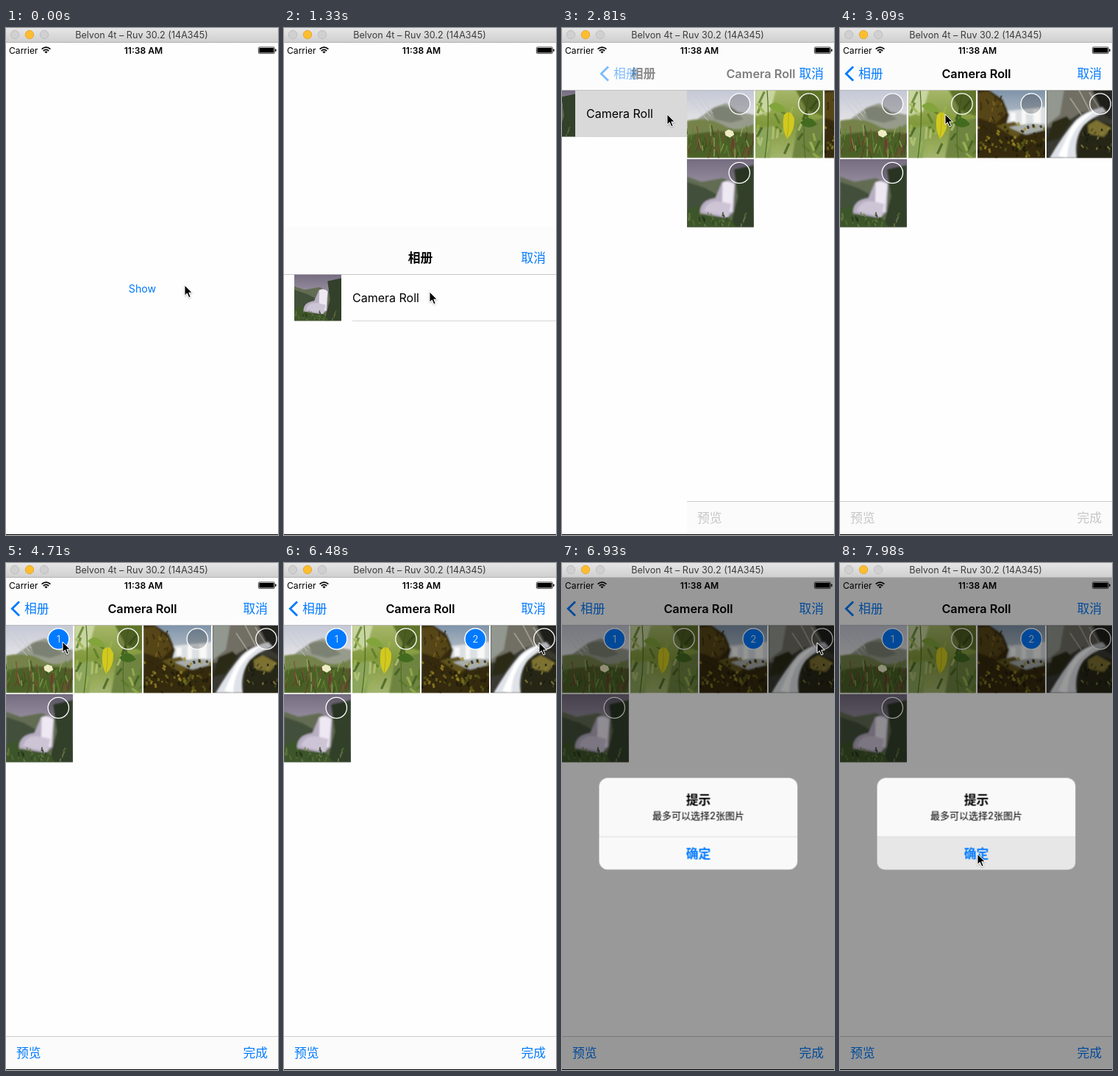
Animation of 370 by 688 pixels, one loop 8000 ms. Source, as an HTML page:

```html
<!DOCTYPE html>
<html lang="zh-CN">
<head>
<meta charset="utf-8">
<title>Photo picker</title>
<style>
  html, body { margin: 0; width: 100%; height: 100%; overflow: hidden; background: #fefefe; }
  svg { display: block; }
  text { font-family: Inter, "Noto Sans CJK SC", "Noto Sans CJK", sans-serif; font-size: 16.8px; white-space: pre; }
  .mid { text-anchor: middle; }
  .end { text-anchor: end; }
  .bold { font-weight: 600; }
  .blue { fill: #007aff; }
</style>
</head>
<body>
<svg id="stage" width="370" height="688" viewBox="0 0 370 688"></svg>
<script>
const LOOP = 8000;
const stage = document.getElementById('stage');

let seed = 7;
const rnd = () => (seed = (seed * 16807) % 2147483647) / 2147483647;
const pick = list => list[Math.floor(rnd() * list.length)];

const rect = (x, y, w, h, fill, more = '') =>
  `<rect x="${x}" y="${y}" width="${w}" height="${h}" fill="${fill}" ${more}/>`;
const shape = (d, fill, more = '') => `<path d="${d}" fill="${fill}" ${more}/>`;
const line = (d, stroke, width = 1, more = '') =>
  `<path d="${d}" fill="none" stroke="${stroke}" stroke-width="${width}" ${more}/>`;
const label = (x, y, text, cls = '', more = '') =>
  `<text x="${x}" y="${y}" class="${cls}" ${more}>${text}</text>`;
const fade = (id, ...colors) =>
  `<linearGradient id="${id}" x1="0" y1="0" x2="0" y2="1">` +
  colors.map((c, i) => `<stop offset="${i / (colors.length - 1)}" stop-color="${c}"/>`).join('') +
  '</linearGradient>';
const soft = content => `<g filter="url(#soft)">${content}</g>`;

// Scattered strokes inside a box; lean and length set the look of grass or moss
function flecks(count, x, y, w, h, colors, lean, length, width) {
  let out = '';
  for (let i = 0; i < count; i++) {
    const px = x + rnd() * w, py = y + rnd() * h;
    const dx = (rnd() - 0.5) * lean, dy = length * (0.4 + rnd() * 0.6);
    out += line(`M${px.toFixed(1)} ${py.toFixed(1)}l${dx.toFixed(1)} ${(-dy).toFixed(1)}`,
      pick(colors), width, 'opacity=".75"');
  }
  return out;
}

const meadow = rect(0, 0, 92, 93, 'url(#haze)') +
  soft(shape('M0 50L20 36 37 24 54 18 70 30 92 34V62H0Z', '#969b8b') +
    shape('M34 27Q50 18 64 28L78 40 60 45 38 40Z', '#7b8273') +
    shape('M0 42Q30 36 50 48T92 46V93H0Z', '#75834c') +
    shape('M0 62Q45 52 92 60V93H0Z', '#4c6027')) +
  line('M0 8L29 42M5 0L32 36M14 0L35 32', '#c8cbd2', 0.9) +
  flecks(70, 0, 60, 92, 35, ['#5f8435', '#38501d', '#824d39', '#9aa85c', '#693c2f'], 9, 17, 1.6) +
  shape('M52 57l5-3 6 2 2 5-6 4-6-3Z', '#eeecc4');

const leaves = rect(0, 0, 93, 93, 'url(#leafy)') +
  soft(shape('M0 0H28L20 30 0 36Z', '#c9d5a0') + shape('M55 0H93V36L70 28Z', '#61742b') +
    shape('M58 48L93 38V93H50Z', '#6e8440') + shape('M0 55L26 48 20 93H0Z', '#8ca65b')) +
  flecks(34, 0, 18, 93, 80, ['#577a25', '#9bb350', '#b8c77b', '#3e5d1b'], 22, 17, 3.2) +
  line('M13 93Q20 45 16 0M68 93Q62 45 75 0', '#506c25', 1.2) +
  shape('M18 22Q30 10 43 29Q28 33 18 22Z', '#82a53b') +
  shape('M61 45Q73 31 84 47Q72 56 61 45Z', '#436b20') +
  shape('M39 34Q47 25 53 39Q54 56 43 67Q35 52 39 34Z', '#d2c91f') +
  line('M45 31Q46 50 43 66', '#aaa51a', 0.8);

const mossFall = rect(0, 0, 93, 93, 'url(#dusk)') +
  soft(shape('M38 29L93 23V55H30Z', '#dce0e3') +
    shape('M45 31h7v20h-7ZM60 28h6v20h-6ZM76 27h10v21H76Z', '#f8f8f6') +
    shape('M0 0H15L34 13 43 34 38 52 60 57 93 47V93H0Z', '#352a10') +
    shape('M0 4L15 2 32 16 39 32 25 46 0 38Z', '#574415') +
    shape('M25 49L50 43 65 55 52 66Z', '#60521a') +
    shape('M42 51Q66 44 93 47V54L66 61Z', '#a8adaa')) +
  flecks(75, 0, 49, 93, 44, ['#77701e', '#29250e', '#a18c28', '#1d1a0b', '#58591a'], 8, 6, 3) +
  flecks(16, 3, 13, 32, 32, ['#332811', '#7a6322'], 8, 7, 2);

const stream = rect(0, 0, 91, 93, '#393932') +
  soft(shape('M0 0H91V20L46 32 20 48 0 52Z', '#716e64') +
    shape('M0 0H24L18 34 0 48Z', '#92988f') +
    shape('M62 0H91V42L78 34Z', '#272820') +
    shape('M8 44L27 36 34 43 18 66 0 71Z', '#292c19') +
    shape('M46 50L62 39 91 49V93H41Z', '#262719') +
    shape('M56 48L68 41 88 52 78 64 57 60Z', '#7d7131')) +
  soft(shape('M76 23Q51 29 39 42Q22 62 4 93H41Q37 66 51 48Q62 37 82 30Z', '#dfe2e8') +
    shape('M66 28Q42 36 31 57L16 90 28 93Q29 63 49 43Z', '#fff')) +
  line('M44 0L59 29M58 3L72 25M32 11L48 35', '#b8b6ae', 2, 'opacity=".6"') +
  flecks(24, 49, 55, 42, 36, ['#88813b', '#4b4b23', '#161911'], 8, 6, 2.4);

const valley = rect(0, 0, 92, 93, 'url(#violet)') +
  soft(shape('M0 24L20 31 49 26 67 33 92 18V93H0Z', '#626c52') +
    shape('M0 31L24 39 41 48 45 66 0 72Z', '#42503b') +
    shape('M65 14L92 8V93H59L70 51Z', '#33402a') +
    shape('M0 69Q27 57 52 72L68 93H0Z', '#3e552b') +
    shape('M18 74Q17 56 39 53L48 32Q58 26 66 34L64 72 54 80Z', '#b8afc2')) +
  soft(shape('M49 32Q57 28 65 34L62 72 48 74Z', '#eee8f3') +
    shape('M23 71Q29 54 48 58L61 61 57 79Z', '#cdc4d6')) +
  flecks(30, 0, 75, 92, 18, ['#304820', '#5c7238', '#203118', '#71804a'], 7, 7, 2);

const photos = [[0, 84, meadow], [93, 84, leaves], [187, 84, mossFall], [281, 84, stream], [0, 178, valley]];
const rings = [[71.5, 103], [166, 103], [260.3, 103], [354, 103], [71.3, 196.5]];

const photo = (x, y, content, w = x ? 92 : 91, h = 92.5) =>
  `<svg x="${x}" y="${y}" width="${w}" height="${h}" viewBox="0 0 92 93" preserveAspectRatio="none">${content}</svg>`;
const ring = ([x, y]) =>
  `<circle cx="${x}" cy="${y}" r="14.2" fill="rgba(0,0,0,.2)" stroke="#fff" stroke-width="1.3"/>`;
const badge = (id, [x, y], n) => `<g id="${id}">
  <circle cx="${x}" cy="${y}" r="14.2" fill="#007aff" stroke="#fff" stroke-width="1.2"/>
  ${label(x, y + 4.8, n, 'mid', 'fill="#fff" style="font-size:13.5px;font-weight:300"')}</g>`;
const light = (x, fill, edge) =>
  `<circle cx="${x}" cy="9" r="5.7" fill="${fill}" stroke="${edge}" stroke-width=".8"/>`;

stage.innerHTML = `
<defs>
  <filter id="soft"><feGaussianBlur stdDeviation="1.1"/></filter>
  <filter id="shade" x="-50%" y="-50%" width="200%" height="200%">
    <feDropShadow dx="0" dy="1" stdDeviation=".8" flood-opacity=".3"/></filter>
  ${fade('bar', '#e7e6e7', '#cfcecf')}
  ${fade('haze', '#c4c8d6', '#e6e5e6', '#cdd2c7')}
  ${fade('leafy', '#a6b769', '#81983b', '#a4b570')}
  ${fade('dusk', '#7e93aa', '#c3c9cc', '#59502d')}
  ${fade('violet', '#756c80', '#a19aa9', '#586050')}
</defs>
${rect(0, 0, 370, 688, '#fefefe')}
<g id="show">${label(185.5, 359, 'Show', 'mid blue', 'style="font-size:14.2px"')}</g>

<g id="modal">
  ${rect(0, 20, 370, 700, '#fefefe')}
  <g id="albums">
    <g id="pressed">${rect(0, 84, 370, 64, '#d9d9d9')}</g>
    ${photo(14, 84, valley, 64, 63.5)}
    ${label(93, 121.5, 'Camera Roll', '', 'style="font-size:16px"')}
    ${rect(93, 147, 277, 1, '#d6d6d8')}
  </g>
  <g id="grid">
    ${rect(0, 84, 370, 604, '#fefefe')}
    ${photos.map(p => photo(...p)).join('')}
    ${rings.map(ring).join('')}
    ${badge('first', rings[0], 1)}${badge('second', rings[2], 2)}
    ${rect(0, 642, 370, 46, '#fbfbfb')}${rect(0, 642, 370, 1, '#cbcbcd')}
    <g id="tools">${label(14, 671.3, '预览')}${label(356, 671.3, '完成', 'end')}</g>
  </g>
  ${rect(0, 20, 370, 64, '#fcfcfc')}${rect(0, 84, 370, 0.8, '#b9b9bb')}
  <g id="listTitle">${label(185.5, 68.3, '相册', 'mid bold')}</g>
  <g id="back">${line('M18 52.5L8.3 62 18 71.5', '#007aff', 2.8)}${label(25, 68.3, '相册', 'blue')}</g>
  <g id="gridTitle">${label(185.5, 68, 'Camera Roll', 'mid bold', 'style="font-size:16.3px"')}</g>
  ${label(356, 68.3, '取消', 'end blue')}
</g>

${label(4, 34.5, 'Carrier', '', 'style="font-size:12.1px"')}
${line('M48.6 28.7Q54.5 23.4 60.4 28.7M50.8 31Q54.5 27.8 58.2 31', '#000', 1.7)}
${shape('M52.4 32.2Q54.5 30.6 56.6 32.2L54.5 34.6Z', '#000')}
${label(187, 34.5, '11:38 AM', 'mid bold', 'style="font-size:12.1px"')}
${rect(343.4, 25.9, 22, 8.7, 'none', 'rx="1.6" stroke="#000" stroke-width=".7"')}
${rect(344.4, 26.9, 20, 6.7, '#000', 'rx=".6"')}${rect(366.2, 28.6, 1.4, 3.4, '#000', 'rx=".7"')}

<g id="dim">${rect(0, 20, 370, 668, '#000')}</g>
<g id="alert">
  ${rect(-135, -62, 270, 124.5, '#f9f9f9', 'rx="12"')}
  <g id="held">${shape('M-135 18H135V50.5Q135 62.5 123 62.5H-123Q-135 62.5-135 50.5Z', '#e7e7e8')}</g>
  ${rect(-135, 17.6, 270, 0.7, '#d2d2d4')}
  ${label(0, -25.8, '提示', 'mid bold')}
  ${label(0, -6.2, '最多可以选择2张图片', 'mid', 'style="font-size:13px"')}
  ${label(0, 46.7, '确定', 'mid bold blue')}
</g>

${rect(0, 0, 370, 20, 'url(#bar)')}${rect(0, 19, 370, 1, '#b5b4b5')}
${light(12, '#d1d0d1', '#b9b8b9')}${light(32, '#fdbd2f', '#dfa023')}${light(52, '#d1d0d1', '#b9b8b9')}
${label(184.5, 14, 'Belvon 4t – Ruv 30.2 (14A345)', 'mid', 'fill="#3b3b3b" style="font-size:12.6px"')}
${rect(0, 687, 370, 1, '#000')}
<g id="cursor"><path d="M0 0V14.2L3.3 11.1 5.8 16.8 8.2 15.8 5.8 10.2H10.2Z" fill="#000"
  stroke="#fff" stroke-width="1" filter="url(#shade)"/></g>`;

// Each step holds until the next one
function track(id, steps) {
  const frames = steps.map(([t, props]) => ({ offset: t / LOOP, easing: 'steps(1, end)', ...props }));
  frames.push({ ...steps[steps.length - 1][1], offset: 1 });
  document.getElementById(id).animate(frames, { duration: LOOP, iterations: Infinity });
}
const move = (x, y, scale = 1) => `translate(${x}px, ${y}px) scale(${scale})`;
const at = (t, x, y) => [t, { transform: move(x, y) }];
const alpha = (...pairs) => pairs.map(([t, opacity]) => [t, { opacity }]);
const pose = (t, x, y, opacity, scale) => [t, { transform: move(x, y, scale), opacity }];

function glide(t0, t1, count, [x0, y0], [x1, y1], bend = 0) {
  return Array.from({ length: count }, (_, i) => {
    const k = (i + 1) / count, e = k * k * (3 - 2 * k);
    return at(t0 + (t1 - t0) * i / (count - 1),
      x0 + (x1 - x0) * e, y0 + (y1 - y0) * e + bend * Math.sin(Math.PI * e));
  });
}

track('show', alpha([0, 1], [1040, 0.25]));
track('modal', [at(0, 0, 680), at(1330, 0, 250), at(1478, 0, 38), at(1626, 0, 0)]);
track('pressed', alpha([0, 0], [2670, 1]));
track('albums', [at(0, 0, 0), at(2810, -60, 0), at(2950, -103, 0)]);
track('grid', [at(0, 370, 0), at(2810, 170, 0), at(2950, 24, 0), at(3090, 0, 0)]);
track('listTitle', [pose(0, 0, 0, 1), pose(2810, -75, 0, 0.45), pose(2950, -135, 0, 0)]);
track('gridTitle', [pose(0, 185, 0, 0), pose(2810, 85, 0, 0.5), pose(2950, 12, 0, 0.95), pose(3090, 0, 0, 1)]);
track('back', [pose(0, 60, 0, 0), pose(2810, 45, 0, 0.5), pose(2950, 8, 0, 0.95), pose(3090, 0, 0, 1)]);
track('first', alpha([0, 0], [4710, 1]));
track('second', alpha([0, 0], [6030, 1]));
track('tools', [[0, { fill: '#c6c6c8' }], [4710, { fill: '#007aff' }]]);
track('dim', alpha([0, 0], [6780, 0.195], [6930, 0.4]));
track('alert', [pose(0, 185.5, 353.6, 0, 1.2), pose(6780, 185.5, 353.6, 0.5, 1.1), pose(6930, 185.5, 353.6, 1, 1)]);
track('held', alpha([0, 0], [7830, 1]));

const rest = [243, 349], onShow = [198, 358], onRow = [143, 117], pause = [111, 119],
  onFirst = [77, 107], onThird = [243, 107], onFourth = [347, 108], onOk = [187, 395];
track('cursor', [
  at(0, ...rest),
  ...glide(150, 440, 3, rest, onShow),
  ...glide(1774, 2070, 3, onShow, onRow),
  ...glide(3370, 3680, 3, onRow, pause),
  ...glide(3810, 4410, 5, pause, onFirst),
  ...glide(4980, 5880, 7, onFirst, onThird, -4),
  ...glide(6180, 6480, 3, onThird, onFourth),
  ...glide(7080, 7680, 5, onFourth, onOk)
]);
</script>
</body>
</html>
```
